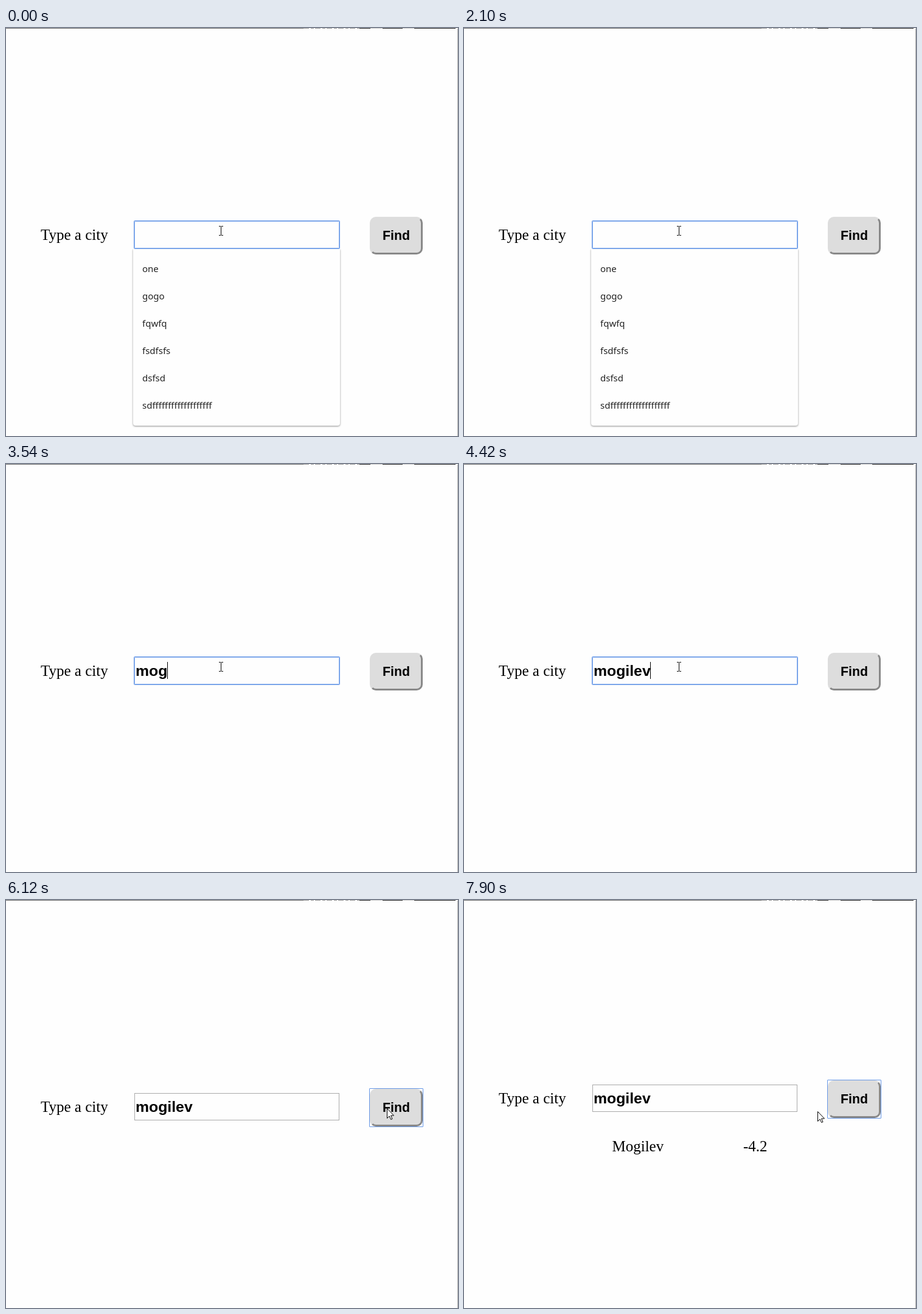
Write an HTML page that moves like this. It is 743 px wide and 672 px high and loops after 8000 ms.

```html
<!DOCTYPE html>
<html lang="en">
<head>
<meta charset="utf-8">
<title>City search</title>
<style>
html, body { margin: 0; width: 100%; height: 100%; overflow: hidden; background: #fefefe; }
div, svg { position: absolute; box-sizing: border-box; }
svg { left: 0; top: 0; overflow: visible; }
#row { left: 0; top: 0; }
.serif { font: 25px "Liberation Serif", serif; }
.sans { font: bold 24.8px "Liberation Sans", sans-serif; }
#field { left: 211px; top: 318px; width: 337px; height: 45px; border: 1px solid #a9a9a9; }
#field.on { border-color: #8fb3ee; box-shadow: 0 0 0 1px #6697e6; border-radius: 1px; }
#find { left: 598px; top: 311px; width: 87px; height: 62px; background: #ddd; border: 3px solid;
  border-color: #ddd #888 #888 #ddd; border-radius: 10px; }
#find.down { border-color: #888 #ddd #ddd #888; }
#ring { left: 597px; top: 310px; width: 89px; height: 64px; border: 1px solid #6697e6; border-radius: 1px; }
#list { left: 209px; top: 364px; width: 340px; overflow: visible; background: #fefefe; border-radius: 0 0 4px 4px;
  box-shadow: 0 1px 3px rgba(0,0,0,.45); clip-path: inset(0 -6px -6px);
  font: 15px/45px "Noto Sans", sans-serif; font-variant-ligatures: none; color: #222; padding: 10px 0 0 15px; }
#list p { margin: 0; height: 45px; }
</style>
</head>
<body>
<svg width="743" height="672">
  <path d="M0 .5H489" stroke="#6a6a6a"/>
  <path d="M489 .5H581" stroke="#999" stroke-dasharray="9 3 5 2"/>
  <path d="M581 .5H599M619 .5H652M671 .5H739" stroke="#222"/>
  <path d="M599 .5H619M652 .5H671" stroke="#ccc"/>
  <path d="M742.5 1V672" stroke="#aaa"/>
</svg>
<div id="row">
  <div id="field"></div>
  <div id="find"></div>
  <div id="ring"></div>
  <svg width="743" height="672">
    <text class="serif" x="57" y="349">Type a city</text>
    <text class="sans" id="typed" x="213" y="349"></text>
    <text class="sans" x="619" y="349" style="font-size:21.3px">Find</text>
    <path id="wave" fill="none" stroke="#f02020"/>
    <rect id="caret" y="326" width="1" height="28"/>
  </svg>
</div>
<div id="list"></div>
<svg width="743" height="672">
  <g id="result" class="serif">
    <text x="243.5" y="414">Mogilev</text>
    <text x="459" y="414">-4.2</text>
  </g>
  <path id="beam" d="M350 326.5h3M354 326.5h3M353.5 327v14M350 341.5h3M354 341.5h3" stroke="#000"/>
  <path id="arrow" d="M.5 .5V16.5L4.2 13L6.7 18.5L9 17.5L6.6 12H11.5Z" fill="#fff" stroke="#000"/>
</svg>
<script>
const $ = id => document.getElementById(id);
const word = 'mogilev';
const caretX = [213, 234, 250, 265, 272, 279, 293, 306];
const keyTimes = [2660, 3070, 3540, 3690, 3830, 3980, 4420];
const blinks = [590, 1140, 1680, 2100, 2660, 5030, 5570, 6000];
const recent = ['one', 'gogo', 'fqwfq', 'fsdfsfs', 'dsfsd', 'sd' + 'f'.repeat(19)];
const lists = [[0, recent], [2790, ['min', 'mon']], [3070, ['mon']], [3540, []]];
const moves = [
  [5160, 536, 371], [5300, 560, 379], [5430, 576, 376], [5570, 604, 360], [5700, 626, 343],
  [7460, 601, 348], [7610, 594, 348], [7750, 584, 348], [7900, 581, 348]
];
const count = (times, t) => times.filter(x => x <= t).length;
const last = (steps, t) => steps.filter(s => s[0] <= t).pop();
const show = (id, on) => { $(id).style.display = on ? '' : 'none'; };

let zigzag = 'M213 353.5';
for (let x = 215; x <= 307; x += 2) zigzag += `L${x} ${x % 4 == 3 ? 351.5 : 353.5}`;
$('wave').setAttribute('d', zigzag);

let shown;
function draw(t) {
  const keys = count(keyTimes, t), focused = t < 6000;
  $('typed').textContent = word.slice(0, keys);
  $('caret').setAttribute('x', caretX[keys]);
  show('caret', count(blinks, t) % 2);
  show('wave', t >= 5570 && focused);
  $('field').className = focused ? 'on' : '';
  $('find').className = !focused && t < 6120 ? 'down' : '';
  show('ring', !focused);

  const items = last(lists, t)[1];
  if (items !== shown) {
    shown = items;
    $('list').innerHTML = items.map(s => `<p>${s}</p>`).join('');
    $('list').style.height = items.length * 45 + 21 + 'px';
    show('list', items.length);
  }

  const done = t >= 6430;
  $('row').style.top = done ? '-14px' : '0';
  show('result', done);

  const at = last(moves, t);
  show('beam', !at);
  show('arrow', at);
  if (at) $('arrow').setAttribute('transform', `translate(${at[1]} ${at[2]})`);
}

const start = performance.now();
function tick() {
  draw((performance.now() - start) % 8000);
  requestAnimationFrame(tick);
}
tick();
</script>
</body>
</html>
```
